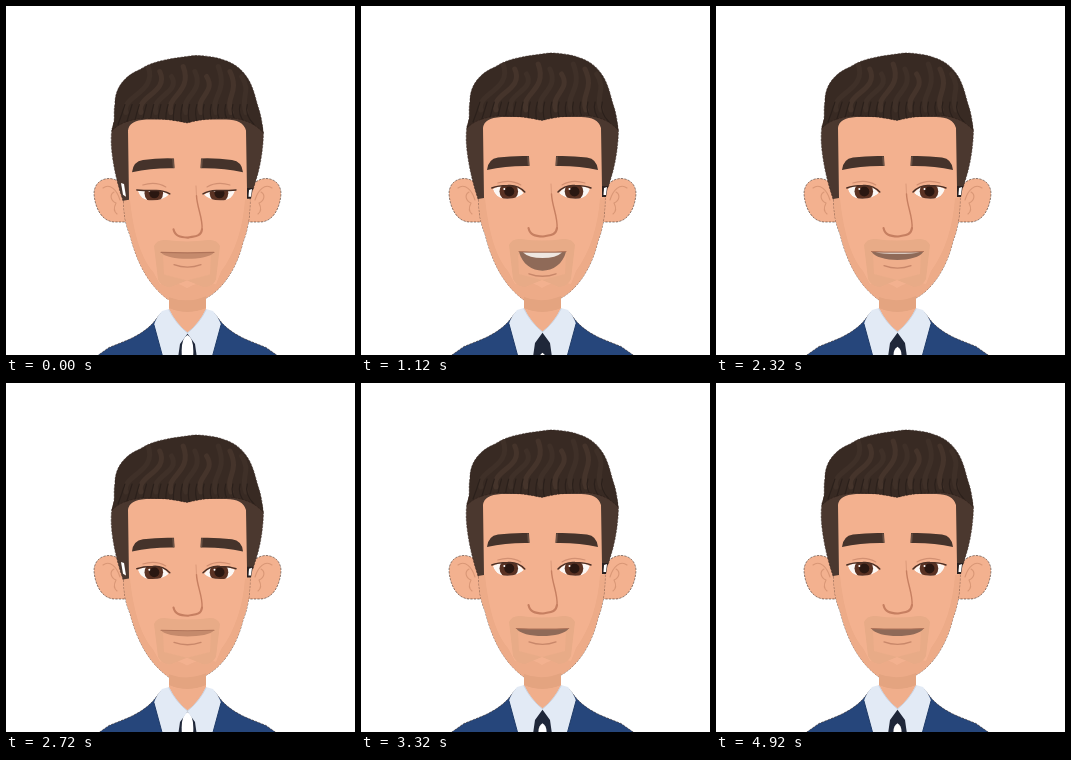
Recreate the animation shown at these times as an HTML page with a canvas. Size 349 by 349 pixels, loop 5000 ms.

```html
<!DOCTYPE html>
<html lang="en">
<head>
<meta charset="utf-8">
<title>Talking man</title>
<style>
html, body { margin: 0; width: 100%; height: 100%; overflow: hidden; background: #fff; }
canvas { display: block; width: 349px; height: 349px; }
</style>
</head>
<body>
<canvas id="stage" width="349" height="349"></canvas>
<script>
const ctx = document.getElementById('stage').getContext('2d');
const LOOP = 5000;
const SKIN = '#f3b18f', SHADE = '#e4a480', LINE = '#c67f61';
const HAIR = '#382a23', SIDES = '#4b382f', BROW = '#45332b';

const NODS = [2, 15, 27, 37, 45];
const SPEECH = [
  [0, 0], [2, .5], [4, .1], [6, .8], [8, .2], [11, .85], [13, .2], [15, .6],
  [18, .1], [20, .8], [23, .14], [27, 0], [30, .7], [33, .08], [36, .8],
  [38, .2], [41, .85], [44, .2], [46, .7], [49, .08], [50, 0]
];

const clamp = v => Math.min(1, Math.max(0, v));
let nod = 0;

// A nod pushes the upper head down and leaves the chin in place.
const warp = y => y + 5 * nod * clamp((300 - y) / 155);
const still = y => y;

function path(d, map = warp) {
  return new Path2D(d.replace(/(-?[\d.]+) (-?[\d.]+)/g, (m, x, y) => x + ' ' + map(+y)));
}

function fill(d, color, map) {
  const p = path(d, map);
  ctx.fillStyle = color;
  ctx.fill(p);
  return p;
}

function stroke(d, color, width, map) {
  ctx.strokeStyle = color;
  ctx.lineWidth = width;
  ctx.stroke(path(d, map));
}

function edge(p) {
  ctx.save();
  ctx.setLineDash([1.5, 2]);
  ctx.strokeStyle = 'rgba(45,30,25,.6)';
  ctx.lineWidth = .9;
  ctx.stroke(p);
  ctx.restore();
}

function dot(x, y, r, color) {
  ctx.fillStyle = color;
  ctx.beginPath();
  ctx.arc(x, y, r, 0, 7);
  ctx.fill();
}

// Runs a drawing step as is, then mirrored about the middle of the face.
function bothSides(step) {
  step();
  ctx.save();
  ctx.translate(363, 0);
  ctx.scale(-1, 1);
  step();
  ctx.restore();
}

function speechAt(i) {
  const k = SPEECH.findIndex(p => p[0] > i);
  const [a, u] = SPEECH[k - 1], [b, v] = SPEECH[k];
  return u + (v - u) * (i - a) / (b - a);
}

function nodAt(i) {
  return Math.max(...NODS.map(c => {
    const d = Math.abs(i - c);
    return d < 4 ? Math.cos(Math.PI * d / 8) ** 2 : 0;
  }));
}

function drawBody(open) {
  const low = y => y + 2 * nod;
  fill('M163 285 L200 285 L200 306 L183 326 L180 326 L163 306 Z', '#f0ae8b', low);
  bothSides(() => edge(fill('M88 351 L103 340.5 L118 334.5 Q137 327 147 316 L155 306 L183 330 L183 351 Z', '#26467b', low)));
  fill('M163 300 L200 300 L182 326 Z', '#f0ae8b', low);
  fill('M181 325 L191 336 L191 351 L171 351 L171 336 Z', '#1f2739', low);
  // the lower tie washes out to white
  const wash = clamp(nod * 1.2 + .5 * (1 - .8 * open));
  const top = 350 - 21 * wash, w = 3 + 4 * wash;
  ctx.fillStyle = '#fff';
  ctx.beginPath();
  ctx.moveTo(181.5, top);
  ctx.quadraticCurveTo(181.5 + w, top + 3, 181.5 + w * .8, 351);
  ctx.lineTo(181.5 - w * .8, 351);
  ctx.quadraticCurveTo(181.5 - w, top + 3, 181.5, top);
  ctx.fill();
  bothSides(() => {
    fill('M163 302 L156 304 Q150 311 148 318 L157 351 L172 351 L174 337 L182 326 Q170 317 163 302 Z', '#e2eaf5', low);
    stroke('M148 318 L157 351', '#1f3b68', 1, low);
    stroke('M163 303 Q170 317 181.5 326', '#c4cedd', .8, low);
  });
}

function drawEars() {
  bothSides(() => {
    edge(fill('M122 186 L116 179 C108 168 88 171 88 188 C89 201 95 215 108 216 L122 216 Z', SKIN, still));
    stroke('M97 182 C104 177 111 184 114 194 M108 186 C103 189 105 195 110 197 C108 201 107 205 111 208', '#d99776', 1.1, still);
  });
}

function drawFace() {
  const left = 'M118 190 Q117 212 124 228 C132 260 145 281 163 294';
  const right = 'M200 292 C217 283 231 261 237 235 Q244 218 244 192';
  const p = fill(left + ' L163 302 Q181 310 200 302 L' + right.slice(1) + ' L246 105 L117 105 Z', SKIN);
  edge(path(left));
  edge(path(right));
  ctx.save();
  ctx.clip(p);
  // jaw and goatee stubble
  fill('M117 192 L124 192 C127 222 134 250 147 265 L154 278 Q168 273 181 282 Q195 273 210 278 L215 265 C229 246 237 220 239 192 L246 192 L242 305 L118 305 Z', '#edab88');
  fill('M148 239 Q151 232 160 233 Q181 236 202 233 Q211 232 214 239 L210 273 Q207 280 198 281 L181 274 L164 281 Q155 280 152 273 Z', '#e8ab87');
  fill('M157 249 Q181 242 205 249 L204 268 L181 274 L158 268 Z', '#efae8b');
  fill('M163 291 Q181 298 200 290 L200 310 L163 310 Z', SHADE);
  ctx.restore();
}

function drawHair() {
  fill('M117 193 Q110 172 107 152 Q104 133 106 120 Q108 107 118 103 L245 103 Q257 110 257.5 124 Q257 145 252 165 L247 182 L241 182 L240 122 Q237 111 220 111 L140 111 Q123 112 122 122 L123 192 Z', SIDES);
  edge(path('M117 193 Q110 172 107 152 Q104 133 106 120 M257.5 124 Q257 145 252 165 L247 182'));
  const p = fill('M106 122 C110 111 107 106 109 95 C109 79 119 67 134 61 C149 51 168 50 188 47 C210 47 230 53 239 66 C247 76 249 88 252 98 Q256 109 257 124 Q246 112 229 110 C210 109 194 111 181 114.5 C166 111 148 109 132 110.5 Q115 113 106 122 Z', HAIR);
  edge(p);
  ctx.save();
  ctx.clip(p);
  for (let k = 0; k < 9; k++) {
    const x = 120 + k * 15, lean = (184 - x) * .22 + 8, y = 58 + 5 * (k % 3);
    stroke(`M${x} 104 C${x - 6} 88 ${x + lean + 10} 84 ${x + lean} ${y}`, k % 2 ? '#45342b' : '#3f3028', 5);
  }
  for (let k = 0; k < 18; k++) {
    const x = 112 + k * 8, bend = (181 - x) * .1;
    stroke(`M${x} 116 Q${x - 3 + bend} 106 ${x + bend} 96`, '#2b201b', 1.2);
  }
  ctx.restore();
}

function drawGaps() {
  fill('M241 180 L247 180 L245 191 L241 191 Z', '#292020');
  fill('M243 182 L246 181 L245 189 L242.5 189 Z', '#fff');
  if (nod > .3) fill('M115 175 L118 176 L120 189 L117 187 Z', '#fff');
}

function drawEye(x, side, lid) {
  // side is 1 when the outer corner points right
  const px = v => x + side * v;
  const top = 178.5 + 8 * lid;
  const lash = `M${px(-16)} 186 Q${px(-9)} ${top} ${px(1)} ${top + 1} Q${px(11)} ${top + 1} ${px(17)} 182`;
  const p = path(`M${px(-15)} 187 Q${px(-9)} ${top} ${px(1)} ${top + 1} Q${px(11)} ${top + 1} ${px(16)} 183 Q${px(13)} 192 ${px(5)} 192.5 Q${px(-9)} 193.5 ${px(-15)} 187 Z`);
  ctx.save();
  ctx.clip(p);
  ctx.fillStyle = '#fbf7f4';
  ctx.fill(p);
  const y = warp(185.5);
  dot(x, y, 9.3, '#5a3223');
  dot(x + .5, y, 5, '#2a1711');
  dot(x - 4.5, y - 2.5, 1, '#fff');
  ctx.restore();
  stroke(lash, '#4a2f25', 1.5);
  stroke(`M${px(-12)} 179 Q${px(-2)} 173 ${px(11)} 177`, '#d29072', 1.1);
}

function drawFeatures(lid) {
  bothSides(() => {
    fill('M126 164 Q127 153 137 151.5 Q152 149.5 168 150 L168.5 160 Q146 159.5 126 164 Z', BROW);
    stroke('M167 151 L167.5 159', '#6b5346', 1.5);
  });
  drawEye(147.8, -1, lid);
  drawEye(213, 1, lid);
  stroke('M190 178 L190.5 188', '#dc9a7a', 1);
  stroke('M190.5 188 C191 200 197 211 196 222', LINE, 1.4);
  stroke('M196 222 C195 230 188 229 182 230.5 C174 230 169 229 167.5 222', LINE, 2.1);
}

function drawMouth(open) {
  const deep = 252 + 20 * open;
  const l = 155 + 3.5 * open, r = 363 - l;
  const lips = `M${l} 245.5 Q168 246 181.5 246 Q195 246 ${r} 245.5 C${r - 6} ${deep + 2} ${l + 6} ${deep + 2} ${l} 245.5 Z`;
  const p = fill(lips, open > .05 ? '#8f6a58' : '#c58a6c');
  if (open > .1) {
    ctx.save();
    ctx.clip(p);
    const t = 247 + 6 * open;
    fill(`M${l + 4} 246.5 L${r - 4} 246.5 Q${r - 10} ${t} 181.5 ${t} Q${l + 10} ${t} ${l + 4} 246.5 Z`, '#efe7e1');
    ctx.restore();
  }
  stroke(`M${l} 245.5 Q168 246 181.5 246 Q195 246 ${r} 245.5`, '#b0745a', 1.1);
  const c = 258 + 11.5 * open;
  stroke(`M168 ${c} Q181.5 ${c + 5} 195 ${c}`, '#c8876a', 1.3);
}

function draw(now) {
  const t = now % LOOP;
  // frames alternate between 120 ms and 80 ms
  const i = 2 * Math.floor(t / 200) + (t % 200 >= 120 ? 1 : 0);
  const open = speechAt(i);
  const lid = clamp(1 - Math.abs(i - 1.5) / 2.5);
  nod = nodAt(i);
  ctx.fillStyle = '#fff';
  ctx.fillRect(0, 0, 349, 349);
  drawBody(open);
  drawEars();
  drawFace();
  drawHair();
  drawGaps();
  drawFeatures(lid);
  drawMouth(open);
}

ctx.lineCap = ctx.lineJoin = 'round';
const start = performance.now();
function tick() {
  draw(performance.now() - start);
  requestAnimationFrame(tick);
}
tick();
</script>
</body>
</html>
```
